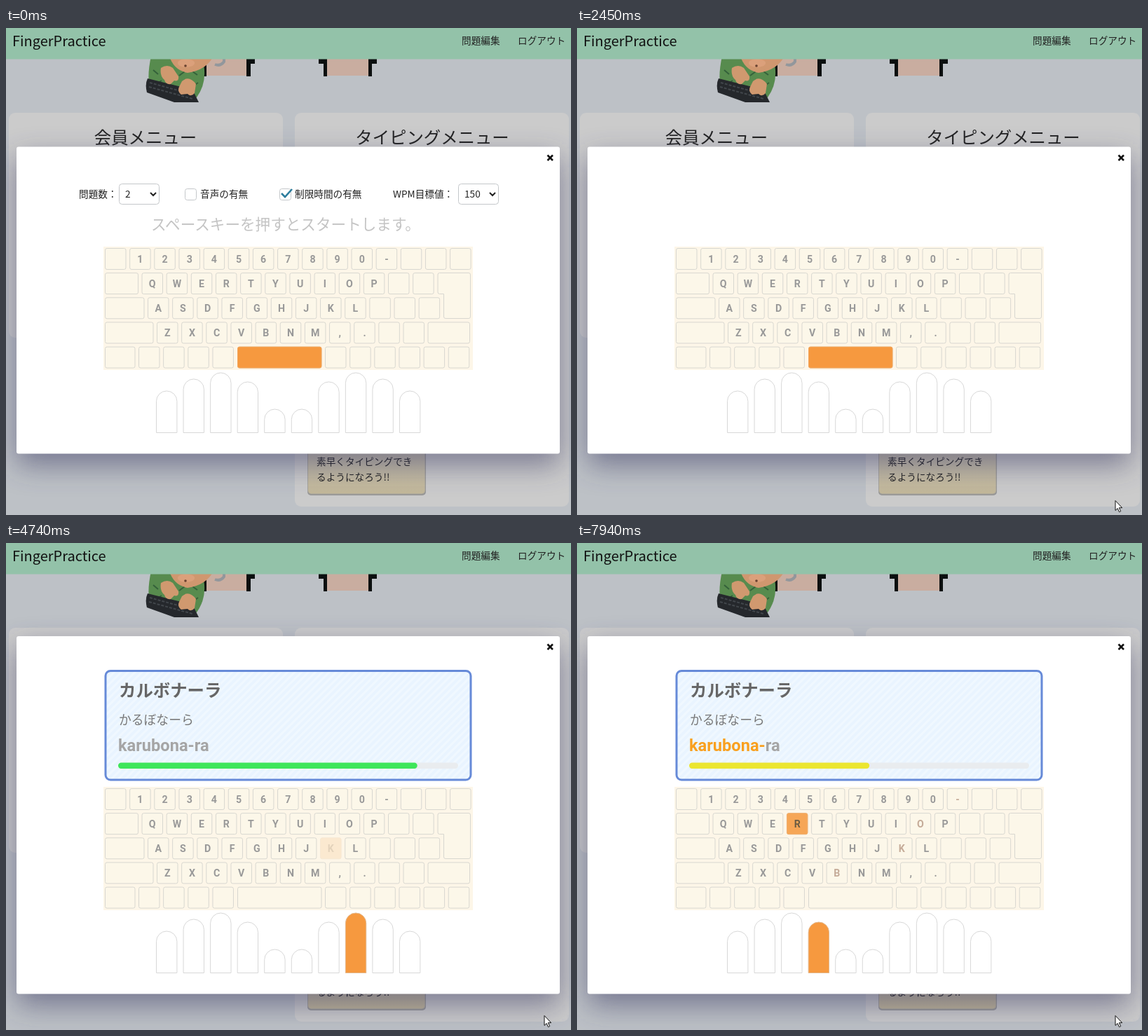
Write an HTML page that moves like this. It is 806 px wide and 695 px high and loops after 8 s.

```html
<!DOCTYPE html>
<html lang="ja">
<head>
<meta charset="utf-8">
<style>
html, body { margin: 0; width: 100%; height: 100%; overflow: hidden; background: #bdc1c6; }
svg { position: absolute; left: 0; top: 0; }
text { font-family: "Noto Sans CJK JP", "Noto Sans CJK", sans-serif; font-weight: 300; font-size: 13.65px; fill: #222; }
.head { font-size: 24.4px; text-anchor: middle; }
.key { fill: #fcf7e9; stroke: #d8d7d0; }
.on { fill: #f6993f; stroke: #f3a85f; }
.label { font: 700 14.2px Roboto, sans-serif; fill: #999; text-anchor: middle; }
.finger { fill: #fff; stroke: #d8d8d8; }
.finger.on { fill: #f6993f; stroke: #e3b98f; }
.field { fill: #fff; stroke: #c4c7ca; }
.count { font-size: 64px; font-weight: 500; fill: #f6993f; text-anchor: middle; }
.roman { font: 600 23.6px Roboto, sans-serif; fill: #a5a5a5; }
</style>
</head>
<body>
<svg id="stage" width="806" height="695" viewBox="0 0 806 695">
  <defs>
    <filter id="blur" x="-20%" y="-30%" width="140%" height="160%"><feGaussianBlur stdDeviation="21"/></filter>
    <pattern id="stripes" width="7" height="7" patternUnits="userSpaceOnUse" patternTransform="rotate(-45)">
      <rect width="7" height="7" fill="#e9f4ff"/><rect width="7" height="3" fill="#f0f8ff"/>
    </pattern>
    <linearGradient id="tan" x2="0" y2="1"><stop stop-color="#c9c9c6"/><stop offset="1" stop-color="#c3b899"/></linearGradient>
  </defs>

  <rect width="806" height="695" fill="#bdc1c6"/>
  <!-- illustration under the header -->
  <g fill="#c9ada0">
    <path d="M280 40h66v28h-66zM457 40h62v28h-62z"/>
    <path d="M280 40h6v29h-6zM343 40h12v11h-6v18h-6zM446 40h12v29h-5v-18h-7zM517 40h12v11h-7v18h-5z" fill="#0b0f0f"/>
    <path d="M207 40Q201 68 205 84L240 102L272 99Q290 74 279 40Z" fill="#578b4e"/>
    <path d="M210 60l7 6M214 80l8-5M247 68l8-6M266 62l7 5M274 78l-7 5" stroke="#34613a" stroke-width="2"/>
    <path d="M233 40Q239 60 259 64Q286 60 296 40Z" fill="#d0976f"/>
    <ellipse cx="257" cy="50" rx="12" ry="6" fill="#dba07b"/>
    <circle cx="256" cy="54" r="1.8" fill="#68412f"/>
    <path d="M298 52q8 3 13-4v-8" fill="none" stroke="#92979c" stroke-width="4"/>
    <path d="M202 72L266 88L275 106H240L201 92Q198 80 202 72Z" fill="#25282c"/>
    <path d="M205 78l62 17M204 84l62 17" stroke="#41464b" stroke-width="2" stroke-dasharray="4 2"/>
    <path d="M221 57q9-6 17 0l8 12q1 8-6 6l-5 5q-7 1-9-6-7-6-5-17zM251 76q10-9 20 4l-2 13q-5 6-10 1l-9 1q-6-5-3-11z" fill="#d0996f"/>
  </g>
  <g fill="#cbcbcb">
    <rect x="4" y="121" width="391" height="321" rx="9"/>
    <rect x="412" y="121" width="391" height="562" rx="9"/>
  </g>
  <text class="head" x="199" y="165">会員メニュー</text>
  <text class="head" x="608" y="165">タイピングメニュー</text>
  <rect x="430" y="540" width="169" height="127" rx="5" fill="#979797"/>
  <rect x="430.5" y="540" width="167.500" height="125" rx="5" fill="url(#tan)" stroke="#a5a39c"/>
  <text x="443" y="624">素早くタイピングでき</text>
  <text x="443" y="646">るようになろう!!</text>

  <rect id="shadow" x="15" width="775" rx="3" fill="#32325d" opacity=".52" filter="url(#blur)"/>
  <rect width="806" height="44.500" fill="#93c2a9"/>
  <text x="9" y="25.500" style="font-size:20px;font-weight:500;fill:#111">FingerPractice</text>
  <text x="650" y="22.500">問題編集</text>
  <text x="730" y="22.500">ログアウト</text>
  <rect id="modal" x="15" width="775" rx="3" fill="#fff"/>
  <path id="close" d="M772.500 -3.500l7.500 7.500m0-7.500l-7.500 7.500" stroke="#111" stroke-width="2.600"/>

  <g id="settings">
    <text x="104" y="241.500">問題数：</text>
    <text x="277" y="241.500">音声の有無</text>
    <text x="412" y="241.500">制限時間の有無</text>
    <text x="552" y="241.500">WPM目標値：</text>
    <g class="field">
      <rect x="161.500" y="222.500" width="57" height="29" rx="4"/>
      <rect x="645.500" y="222.500" width="57" height="29" rx="4"/>
      <rect x="255.500" y="229.500" width="16" height="16" rx="3"/>
      <rect x="390.500" y="229.500" width="16" height="16" rx="3"/>
    </g>
    <text x="170" y="242">2</text>
    <text x="654" y="242">150</text>
    <path d="M206 235l4 4 4-4M690 235l4 4 4-4" fill="none" stroke="#222" stroke-width="2"/>
    <path d="M393 236l5 5 10-11" fill="none" stroke="#2d7d9d" stroke-width="2.600"/>
    <text x="207" y="288" style="font-size:21.6px;fill:#c4c4c4">スペースキーを押すとスタートします。</text>
  </g>
  <text id="count" class="count" x="403" y="277.500"></text>

  <g id="question">
    <rect x="142" y="182.500" width="521" height="155.500" rx="7" fill="url(#stripes)" stroke="#668ad8" stroke-width="3"/>
    <text x="161" y="218.500" style="font-size:24.4px;font-weight:700;fill:#666">カルボナーラ</text>
    <text x="161" y="259" style="font-size:17.8px;fill:#777">かるぼなーら</text>
    <text class="roman" x="160" y="297"><tspan id="done" fill="#f9a01f"></tspan><tspan id="rest"></tspan></text>
    <rect x="160" y="313.500" width="485" height="8.500" rx="4.200" fill="#e9ecef"/>
    <rect id="bar" x="160" y="313.500" height="8.500" rx="4.200"/>
  </g>

  <g id="board"><rect x="139" y="312" width="527" height="176" fill="#fdf6e8"/></g>
  <path id="cursor" d="M768 674.500v14l3.200-3 2.300 5.200 2.200-1-2.300-5h4.300z" fill="#fff" stroke="#111"/>
</svg>
<script>
const $ = id => document.getElementById(id);
const board = $('board');
const keys = {}, fingers = [];
const PITCH = 35.15;

function add(parent, tag, attrs, text = '') {
  const el = document.createElementNS('http://www.w3.org/2000/svg', tag);
  for (const name in attrs) el.setAttribute(name, attrs[name]);
  el.textContent = text;
  parent.append(el);
  return el;
}

function addKey(x, row, width, label) {
  const y = 314.5 + row * PITCH;
  const g = add(board, 'g', {});
  const base = add(g, 'rect', { class: 'key', x, y, width, height: 30, rx: 2.5 });
  const lit = add(g, 'rect', { class: 'on', x, y, width, height: 30, rx: 2.5 });
  const text = add(g, 'text', { class: 'label', x: x + width / 2, y: y + 20.5 }, label.trim());
  if (label !== ' ') keys[label] = { base, lit, text };
  lit.style.opacity = 0;
}

function addRun(x, row, labels) {
  [...labels].forEach((c, i) => addKey(x + i * PITCH, row, 29.5, c));
}

addRun(141.5, 0, ' 1234567890-   ');
addKey(141.5, 1, 47, ' ');
addRun(194, 1, 'QWERTYUIOP  ');
addKey(141.5, 2, 55.5, ' ');
addRun(202.5, 2, 'ASDFGHJKL   ');
addKey(141.5, 3, 68.5, ' ');
addRun(215.5, 3, 'ZXCVBNM,.  ');
addKey(602, 3, 59.5, ' ');
addKey(141.5, 4, 42.5, ' ');
addRun(189.5, 4, '    ');
addKey(330.5, 4, 119.5, '   ');
addRun(455.5, 4, '      ');
add(board, 'path', { class: 'key', d: 'M618.5 349.500h41.500q2.500 0 2.500 2.500v60q0 2.500-2.500 2.500h-33q-2.500 0-2.500-2.500v-32.500h-6q-2.500 0-2.500-2.500v-25q0-2.500 2.500-2.500z' });

const tops = [518, 501, 492, 505, 544];
[...tops, ...tops.slice().reverse()].forEach((top, i) => {
  const x = 214.5 + i * 38.55;
  fingers.push(add(board, 'path', { class: 'finger', d: `M${x} 577.5V${top + 14.7}a14.7 14.7 0 0 1 29.400 0V577.5z` }));
});

const WORD = 'karubona-ra';
const START = 3600;
const strokes = [5330, 5640, 5880, 6100, 6330, 6700, 7000, 7330, 7800];
const fingerOf = { k: 7, a: 0, r: 3, u: 6, b: 3, o: 8, n: 6, '-': 8 };
const timer = [[START, 1], [4740, .88], [5430, .8], [6800, .651], [8000, .524]];
const clamp = v => Math.max(0, Math.min(1, v));

function remaining(t) {
  const i = Math.max(1, timer.findIndex(p => t <= p[0]));
  const [t0, a] = timer[i - 1], [t1, b] = timer[i];
  return a + (b - a) * (t - t0) / (t1 - t0);
}

function draw(t) {
  const playing = t >= START;
  const top = playing ? 133 : 169.5, height = playing ? 510.5 : 438;
  $('modal').setAttribute('y', top);
  $('modal').setAttribute('height', height);
  $('shadow').setAttribute('y', top + 16);
  $('shadow').setAttribute('height', height);
  $('close').setAttribute('transform', `translate(0 ${playing ? 148 : 185})`);
  board.setAttribute('transform', `translate(0 ${playing ? 36 : 0})`);

  $('settings').style.opacity = clamp(1 - (t - 40) / 460);
  $('cursor').style.opacity = t < 300 ? 0 : 1;

  // countdown, one digit per second
  const step = Math.floor((t - 500) / 1000), local = t - 500 - step * 1000;
  const counting = step >= 0 && step < 3;
  $('count').textContent = counting ? 3 - step : '';
  $('count').style.opacity = Math.min(clamp((local - 40) / 400), clamp((930 - local) / 330));

  const typed = strokes.filter(s => s <= t).length;
  const next = WORD[typed];
  const since = t - (typed ? strokes[typed - 1] : START);
  const blink = Math.abs(1 - since / 1000 % 2);
  const active = playing ? next.toUpperCase() : '   ';
  for (const name in keys) {
    const { base, lit, text } = keys[name];
    const on = name === active;
    const glow = on ? (playing ? blink : 1) : 0;
    const used = WORD.slice(0, typed).toUpperCase().includes(name);
    lit.style.opacity = glow;
    base.style.strokeOpacity = on ? glow : 1;
    text.style.opacity = on ? glow : 1;
    text.style.fill = on ? '#55503f' : used && 'KOB-'.includes(name) ? '#c5ab98' : '#999';
  }
  fingers.forEach((f, i) => f.classList.toggle('on', playing && i === fingerOf[next]));

  $('question').style.opacity = clamp((t - START) / 500);
  $('done').textContent = WORD.slice(0, typed);
  $('rest').textContent = WORD.slice(typed);
  const left = playing ? remaining(t) : 1, spent = 1 - left;
  $('bar').setAttribute('width', 485 * left);
  $('bar').setAttribute('fill', `rgb(${2 + 496 * spent}, 230, ${105 - 123 * spent})`);
}

function tick() {
  draw(performance.now() % 8000);
  requestAnimationFrame(tick);
}
tick();
</script>
</body>
</html>
```
